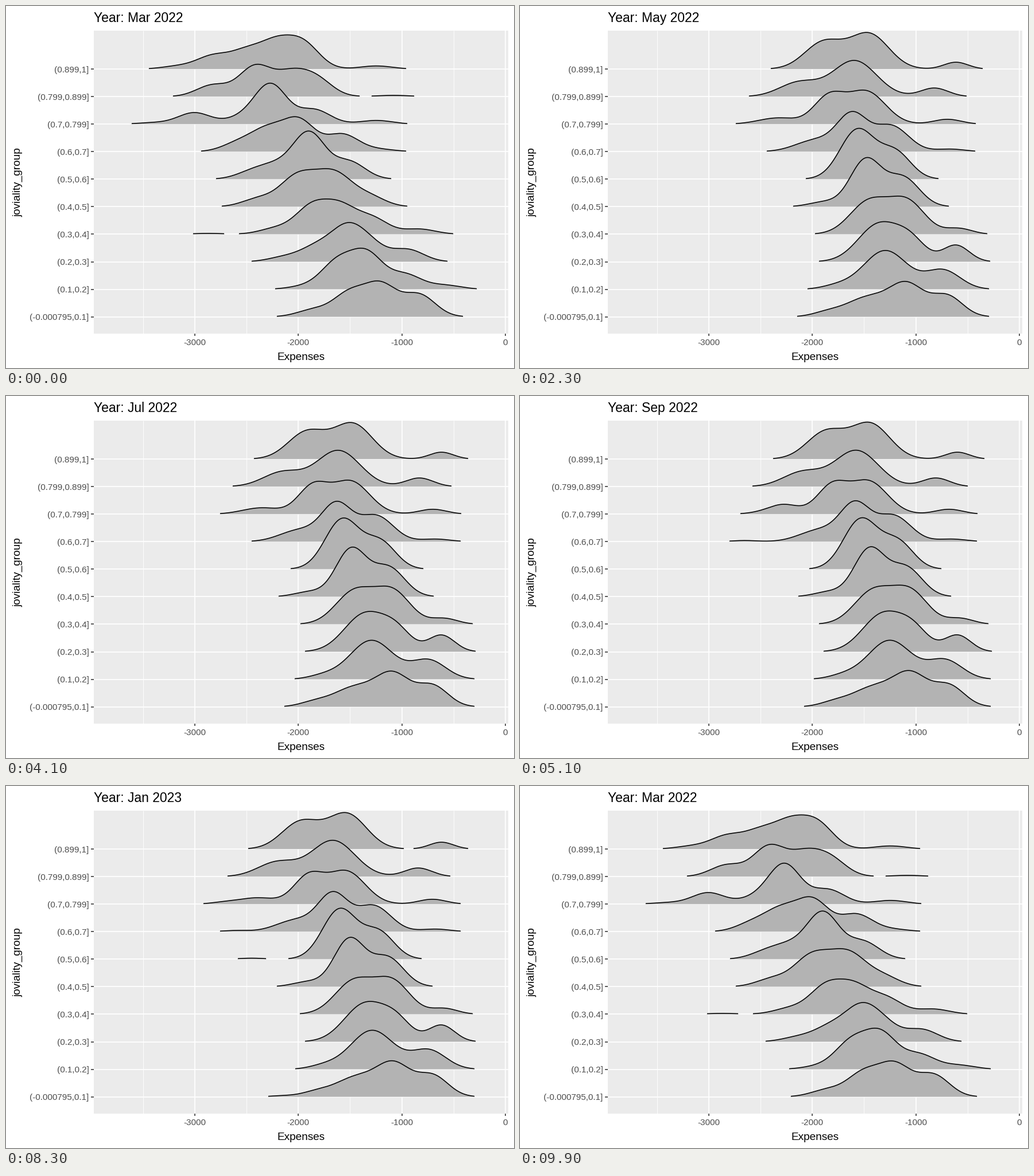
Recreate the animation shown at these times as a matplotlib script. Size 885 px wide and 632 px high, loop 10000 ms.

```python
import numpy as np
import matplotlib.pyplot as plt
from matplotlib.animation import FuncAnimation
from matplotlib.patches import Polygon, Rectangle

W, H, DPI = 885, 632, 100
PT = 72 / DPI
plt.rcParams["font.family"] = "Liberation Sans"

LEFT, RIGHT, TOP, BOTTOM = 153, 875.3, 42.6, 571.6
X0, X_UNIT = 870, 0.1804          # pixel of zero, pixels per unit
ROW0, ROW_STEP = 110.1, 48.06
CUT = 0.95                        # lower parts of a ridge are not drawn
GRID = np.arange(195, 846.0)

GROUPS = ["(0.899,1]", "(0.799,0.899]", "(0.7,0.799]", "(0.6,0.7]", "(0.5,0.6]",
          "(0.4,0.5]", "(0.3,0.4]", "(0.2,0.3]", "(0.1,0.2]", "(-0.000795,0.1]"]
MONTHS = "Mar Apr May Jun Jul Aug Sep Oct Nov Dec Jan Feb".split()
DAYS = [31, 30, 31, 30, 31, 31, 30, 31, 30, 31, 31, 28]

# Each ridge is a sum of bell curves: centre, height and, if unusual, width.
MARCH = [
    [(300, 5), (360, 22), (418, 29), (470, 42), (518, 43), (645, 5.5)],
    [(360, 20), (434, 52), (495, 36), (540, 30), (675, 2.2)],
    [(258, 2.5), (328, 20), (410, 10), (461, 69), (537, 25), (645, 6.5)],
    [(405, 15), (455, 36), (510, 54), (586, 30), (650, 4)],
    [(430, 13), (472, 20), (528, 80), (598, 30)],
    [(440, 14), (502, 43), (540, 30), (578, 46), (632, 18)],
    [(352, 1.5), (470, 10), (532, 46), (582, 45), (638, 27), (720, 9)],
    [(485, 8), (540, 24), (592, 53), (632, 29), (700, 21)],
    [(520, 5), (577, 46), (629, 60), (696, 25), (765, 7)],
    [(535, 12), (598, 40), (653, 54), (720, 38)],
]
TYPICAL = [
    [(528, 47, 33), (607, 61, 34), (760, 12, 21)],
    [(486, 25, 34), (582, 63, 38), (722, 15, 24)],
    [(450, 11, 33), (538, 47, 26), (603, 57, 33), (745, 8.5, 24)],
    [(515, 20, 34), (579, 64, 26), (647, 45, 30), (750, 4.5, 25)],
    [(589, 87, 30), (655, 46, 27)],
    [(530, 8, 25), (604, 83, 27), (669, 50, 28)],
    [(610, 57, 33), (676, 56, 31), (765, 10, 23)],
    [(628, 66, 36), (683, 32, 26), (760, 29, 23)],
    [(555, 6, 25), (639, 68, 38), (738, 33, 30)],
    [(540, 8, 25), (608, 33, 35), (676, 56, 30), (745, 36, 27)],
]
# Lone big spenders: month, row, centre, height.
STRAYS = [("Sep", 2, 460, 6), ("Sep", 3, 391, 2), ("Nov", 2, 424, 5), ("Nov", 9, 510, 3),
          ("Jan", 2, 378, 2.5), ("Jan", 3, 400, 2), ("Jan", 4, 428, 1.8), ("Jan", 9, 482, 1.8)]

# Sideways drift of the main peaks over the year, for the top and bottom row.
KEYS = [2, 4, 6, 8, 10]
DRIFT_TOP = np.interp(range(12), KEYS, [3, 1, -2, -5, -10])
DRIFT_LOW = np.interp(range(12), KEYS, [-3, 1, 1, 6, 4])


def bump(x, h, w=28):
    return h * np.exp(-0.5 * ((GRID - x) / w) ** 2)


def month_ridges(m):
    """Ridges of an ordinary month: longer months spend more."""
    scale = DAYS[m] / 30.6
    rows = []
    for r, parts in enumerate(TYPICAL):
        drift = DRIFT_TOP[m] + (DRIFT_LOW[m] - DRIFT_TOP[m]) * r / 9
        row = 0
        for x, h, w in parts:
            x += drift * np.clip((760 - x) / 160, 0, 1)
            row = row + bump(X0 - (X0 - x) * scale, h, w)
        rows.append(row)
    for name, r, x, h in STRAYS:
        if name == MONTHS[m]:
            rows[r] = rows[r] + bump(x, h, 22)
    return np.array(rows)


march = np.array([sum(bump(*b) for b in parts) for parts in MARCH])
STATES = [march] + [month_ridges(m) for m in range(1, 12)]

STARTS = [5, 14, 23, 32, 41, 49, 56, 64, 72, 80, 88, 96]


def place(frame):
    """Position on the month cycle; whole numbers are rests."""
    return sum(min(max((frame - s + 1) / (3 if s == 49 else 4), 0), 1) for s in STARTS)


fig = plt.figure(figsize=(W / DPI, H / DPI), dpi=DPI, facecolor="white")
ax = fig.add_axes([0, 0, 1, 1])
ax.set_xlim(0, W)
ax.set_ylim(H, 0)
ax.axis("off")


def rule(xs, ys, color, width):
    ax.plot(xs, ys, color=color, lw=width * PT, solid_capstyle="butt", zorder=1)


def label(x, y, text, px, color="black", **kw):
    return ax.text(x, y, text, fontsize=px * PT, color=color, va="baseline", **kw)


ax.add_patch(Rectangle((LEFT, TOP), RIGHT - LEFT, BOTTOM - TOP, fc="#EBEBEB", lw=0, zorder=0))
for v in range(-3500, 0, 1000):
    rule([X0 + v * X_UNIT] * 2, [TOP, BOTTOM], "white", 0.9)
for v in range(-3000, 1, 1000):
    x = X0 + v * X_UNIT
    rule([x, x], [TOP, BOTTOM], "white", 1.8)
    rule([x, x], [BOTTOM, BOTTOM + 4.8], "#333333", 1.6)
    label(x, 592.5, str(v), 15.3, "#4D4D4D", ha="center")

fills, lines, bases = [], [], []
for r, name in enumerate(GROUPS):
    y = ROW0 + ROW_STEP * r
    bases.append(y)
    rule([LEFT, RIGHT], [y, y], "white", 1.8)
    rule([LEFT - 4.8, LEFT], [y, y], "#333333", 1.6)
    label(144.5, y + 5.7, name, 15.3, "#4D4D4D", ha="right")
    fill = Polygon([(0, y), (1, y), (1, y)], fc="#B3B3B3", lw=0, zorder=3 + r)
    fills.append(ax.add_patch(fill))
    lines += ax.plot([], [], color="black", lw=1.6 * PT, solid_capstyle="butt",
                     solid_joinstyle="round", zorder=3.5 + r)

label(514.3, 618, "Expenses", 19, ha="center")
label(25, 307.5, "joviality_group", 19, ha="center", rotation=90, rotation_mode="anchor")
title = label(153.3, 28.3, "", 22.9)


def draw(frame):
    p = place(frame)
    k = int(p)
    t = p - k
    rows = (1 - t) * STATES[k % 12] + t * STATES[(k + 1) % 12]
    for h, y, fill, line in zip(rows, bases, fills, lines):
        shown = h >= CUT
        top = y - np.where(shown, h, 0)
        fill.set_xy(np.column_stack([np.r_[GRID, GRID[-1], GRID[0]], np.r_[top, y, y]]))
        line.set_data(GRID, np.where(shown, top, np.nan))
    near = int(p + 0.5) % 12
    title.set_text(f"Year: {MONTHS[near]} {2022 if near < 10 else 2023}")
    return [*fills, *lines, title]


anim = FuncAnimation(fig, draw, frames=100, interval=100, repeat=True, repeat_delay=0)
plt.show()
```
